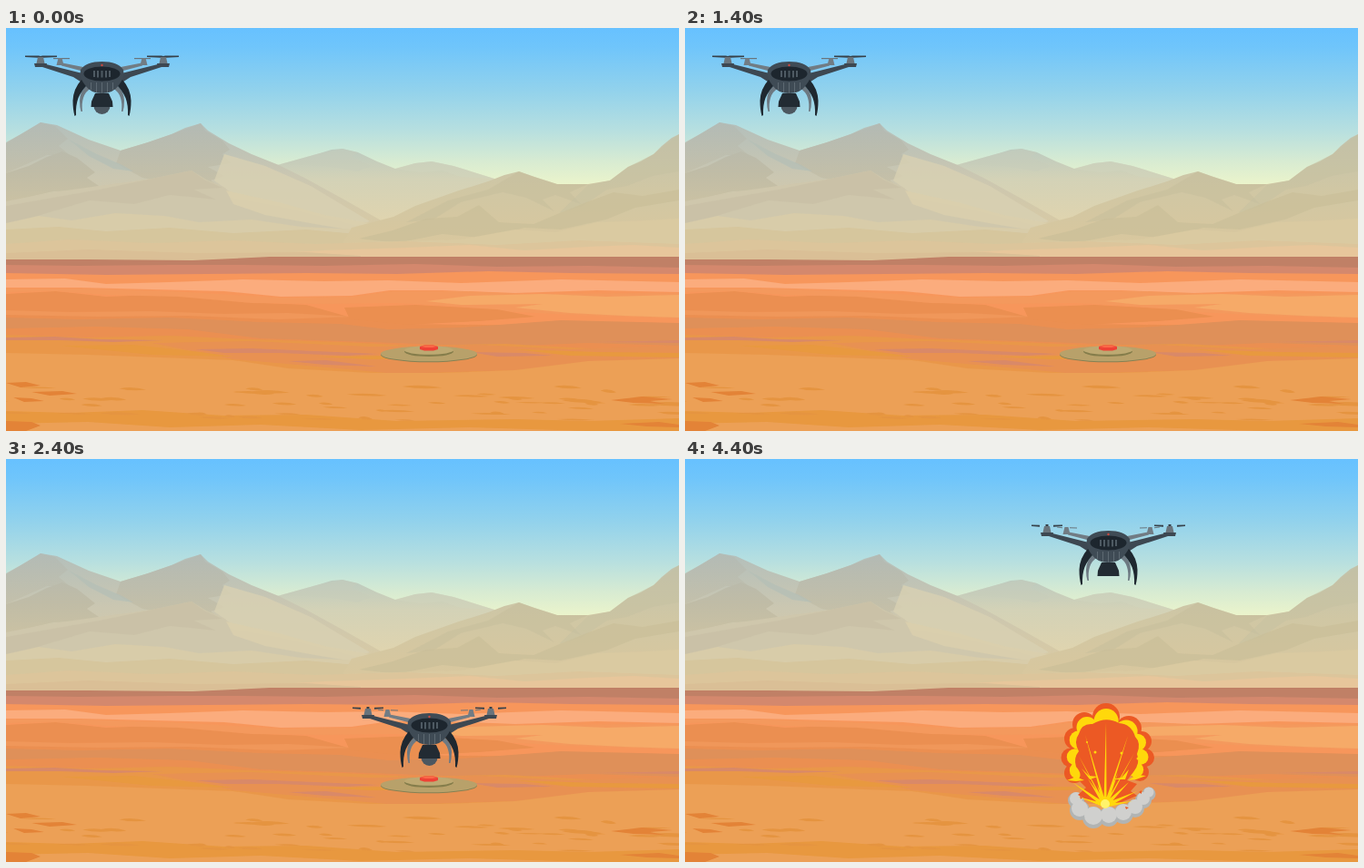
Animation of 740 by 444 pixels, one loop 5.59 s. Source, as an HTML page:

```html
<!DOCTYPE html>
<html lang="en">
<head>
<meta charset="utf-8">
<title>Desert drone</title>
<style>
html, body { margin: 0; width: 100%; height: 100%; overflow: hidden; }
svg { display: block; width: 100%; height: 100%; }
</style>
</head>
<body>
<svg viewBox="0 0 740 444" preserveAspectRatio="none">
<defs>
  <linearGradient id="sky" gradientUnits="userSpaceOnUse" x1="0" y1="0" x2="0" y2="172">
    <stop offset="0" stop-color="#67c1ff"/><stop offset=".12" stop-color="#6fc5fb"/>
    <stop offset=".4" stop-color="#92d2ec"/><stop offset=".65" stop-color="#b6dfe0"/>
    <stop offset=".85" stop-color="#d7ebd2"/><stop offset="1" stop-color="#ebf4cb"/>
  </linearGradient>
  <linearGradient id="left" gradientUnits="userSpaceOnUse" x1="0" y1="104" x2="0" y2="225">
    <stop offset="0" stop-color="#b3bfbb"/><stop offset=".5" stop-color="#cbc7b1"/><stop offset="1" stop-color="#d9caa3"/>
  </linearGradient>
  <linearGradient id="leftDark" gradientUnits="userSpaceOnUse" x1="0" y1="104" x2="0" y2="215">
    <stop offset="0" stop-color="#b2b8b2"/><stop offset=".5" stop-color="#c0bca6"/><stop offset="1" stop-color="#d1c5a1"/>
  </linearGradient>
  <linearGradient id="mid" gradientUnits="userSpaceOnUse" x1="0" y1="133" x2="0" y2="215">
    <stop offset="0" stop-color="#bccabf"/><stop offset=".4" stop-color="#d3d2b7"/><stop offset="1" stop-color="#e0d4ae"/>
  </linearGradient>
  <linearGradient id="right" gradientUnits="userSpaceOnUse" x1="0" y1="118" x2="0" y2="235">
    <stop offset="0" stop-color="#c2c2ac"/><stop offset=".5" stop-color="#d0c7a4"/><stop offset="1" stop-color="#d8c79e"/>
  </linearGradient>

  <g id="half">
    <path fill="#717c84" d="M62 38.500L90 44 86 48 61 41.500zM57.500 33h4l2 8h-8z"/>
    <path fill="#6d7982" d="M90 62Q81 70 81 80 81 87 82.500 92L84 92Q83 83 85 77 87 70 94 66z"/>
    <path fill="#3d4852" d="M42 39.500L84 50 95 60 88 63 74 54 40 43zM31 39h14l-1 4H32z"/>
    <path fill="#69747c" d="M35 32h6l1.500 7h-9z"/>
    <path fill="#1f2830" d="M83 57Q74 67 73.500 80 73.500 90 75.500 97L77 96Q76.500 85 79.500 77 83 69 90 62z"/>
  </g>
  <g id="fullProps" fill="#36414a">
    <path d="M21 30.500h15l2 .5 2-.5h16v1.500l-16 .7h-4l-15-.7z"/>
    <path fill="#68747c" d="M52 33h18v1.200H52z"/>
  </g>
  <g id="splitProps" fill="#36414a">
    <path d="M21 30.500l9 .2v2l-9-.8zM45 30.700l10-.2v1.500l-10 .8zM36.500 30h3v3h-3z"/>
    <path fill="#68747c" d="M49 32.500l6 .7v1l-6-.7zM63 33.200l8 .3v1l-8-.3z"/>
  </g>
</defs>

<rect width="740" height="444" fill="url(#sky)"/>

<!-- mountains -->
<path fill="url(#mid)" d="M290 153L302 150 345 138 358 134 370 133 387 137 408 147 428 155 450 149 468 147 492 152 537 166 560 240 290 240z"/>
<path fill="#d2d6bd" opacity=".5" d="M428 155L450 149 468 147 492 152 537 166 500 164 480 157 455 159z"/>
<path fill="#c5cab8" opacity=".4" d="M302 150L345 138 370 133 387 137 380 142 402 152 386 158 350 152z"/>
<path fill="url(#left)" d="M0 126L18 116 38 104 56 107 91 123 126 135 156 126 182 117 197 110 214 105 222 113 245 127 270 139 300 151 330 166 370 188 430 222 430 258H0z"/>
<path fill="url(#leftDark)" opacity=".75" d="M126 135L156 126 182 117 214 105 219 113 238 124 246 134 238 139 247 149 222 153 240 163 225 168 246 182 205 178 150 165 121 149z"/>
<path fill="url(#leftDark)" opacity=".6" d="M0 127L18 116 38 104 54 108 68 122 58 130 70 140 45 140 0 160z"/>
<path fill="#b4bfb7" opacity=".7" d="M68 122L98 138 128 151 140 158 118 155 91 141z"/>
<path fill="#d9d1b3" opacity=".8" d="M240 139L285 152 335 174 400 213 368 221 320 207 262 196 238 180 247 181 229 168z"/>
<path fill="url(#leftDark)" d="M0 160L25 152 45 142 62 136 78 143 98 159 89 165 102 174 82 179 52 180 0 192z"/>
<path fill="#cfc7ac" d="M0 191L52 181 102 174 160 166 204 157 220 167 241 176 248 187 300 196 365 212 420 228 420 250H0z"/>
<path fill="#c6bea4" opacity=".55" d="M102 178L160 166 204 157 218 167 238 176 207 178 231 189 180 184 141 194 92 190 35 207 0 217V196z"/>
<path fill="#dbd0ad" opacity=".9" d="M242 179L300 192 350 206 405 216 400 226 340 216 285 206 250 194z"/>
<path fill="#d8cca9" d="M0 215L36 207 72 212 120 204 174 207 212 214 270 211 324 219 410 223 450 258H0z"/>
<path fill="#d6c69d" d="M0 222L58 219 110 224 180 220 250 226 330 222 430 231 430 258H0z"/>
<path fill="url(#right)" d="M380 220L426 208 450 196 498 179 530 169 548 162 564 158 581 164 606 172 640 172 664 168 684 153 698 147 712 139 721 130 732 121 740 117V256H360z"/>
<path fill="#c5be9b" opacity=".5" d="M564 158L581 164 606 172 640 172 620 181 632 194 604 184 590 189 603 202 572 187 546 181 500 192 470 211 440 214 486 190 530 178z"/>
<path fill="#c4bf9f" opacity=".45" d="M640 173L664 168 684 153 712 139 740 117V158L711 163 683 174 661 178 634 196 608 204z"/>
<path fill="#cabf98" opacity=".65" d="M388 232L425 223 462 210 496 208 520 195 542 214 580 216 606 205 638 192 668 181 700 185 740 178V190L692 198 660 211 610 222 570 220 530 232 480 227 430 237z"/>
<path fill="#dacaa1" d="M360 238L430 235 500 233 560 222 604 225 650 214 704 212 740 210V258H330z"/>
<path fill="#dcc59b" d="M0 238L70 233 160 237 250 234 340 238 440 235 540 239 630 234 740 238V260H0z"/>
<path fill="#e7c69b" d="M270 250L350 245 440 242 510 239 570 245 640 241 690 239 740 242V260H270z"/>
<path fill="#dabf96" d="M0 248L90 244 210 248 330 247 390 251 390 260H0z"/>

<!-- desert floor -->
<path fill="#c08066" d="M0 255L90 255 205 256 250 254 290 252 740 252V444H0z"/>
<path fill="#d4886d" d="M0 261L80 262 180 261 260 261 350 262 450 260 540 263 640 262 740 264V444H0z"/>
<path fill="#f7965b" d="M0 270L110 272 220 271 330 270 430 271 530 268 620 270 740 271V444H0z"/>
<path fill="#fbac7d" d="M0 277L65 276 110 282 180 280 260 277 350 279 420 278 500 281 610 277 740 280V291L650 289 560 292 480 289 422 289 380 295 302 296 240 290 160 288 82 286 0 286z"/>
<path fill="#eb8f51" d="M0 293L55 290 110 296 190 293 260 302 330 305 376 318 445 326 740 330V444H0z"/>
<path fill="#f4995d" d="M0 287L82 287 180 290 302 297 382 296 424 290 500 290 570 293 740 292V320L650 317 560 313 500 307 430 303 350 304 270 303 190 296 110 294 55 290 0 291z"/>
<path fill="#f6aa68" d="M462 301L510 295 590 293 660 296 740 294V319L680 317 620 314 560 308 590 304 500 305z"/>
<path fill="#f0975a" d="M0 311L70 313 160 312 240 315 310 314 382 318 300 321 200 317 100 318 0 316z"/>
<path fill="#df9059" d="M0 319L80 321 180 319 280 324 368 326 420 332 500 330 610 322 740 325V350L640 347 540 351 400 346 280 342 200 332 100 329 0 331z"/>
<path fill="#eb8f50" d="M372 308L450 305 540 310 582 318 520 323 440 327 378 321z"/>
<path fill="#e99749" d="M0 338L90 341 180 339 270 343 370 346 450 350 550 348 640 353 740 352V444H0z"/>
<path fill="#e89152" d="M160 347L270 345 400 351 520 349 620 354 740 350V371L650 367 560 377 430 381 320 371 250 365z"/>
<path fill="#d98968" d="M0 341L54 340 105 343 174 344 118 346 60 344 0 344zM208 354L270 353 340 356 410 359 375 361 300 358 240 358zM310 367L352 366 408 373 350 371zM510 357L570 358 602 361 540 362zM650 346L740 344V347z"/>
<path fill="#e8993f" d="M60 350L140 349 214 357 250 362 160 360zM560 354L650 357 740 358V363L620 361zM340 362L430 361 500 364 400 365z"/>
<path fill="#eca056" d="M0 358L90 360 170 363 250 366 310 375 400 380 480 380 560 377 640 367 740 364V444H0z"/>
<path fill="#e8983f" d="M0 422L70 424 150 421 240 427 330 426 430 433 560 431 640 433 740 430V444H640L510 440 390 443 280 437 180 440 90 434 0 436z"/>
<path id="ripples" fill="#e59440"/>
<path fill="#e38337" d="M0 391L22 390 38 394 16 396zM28 401L62 400 78 403 48 405zM0 433L28 434 38 438 22 444H0zM665 410L700 406 733 409 708 411 725 414 690 413zM8 407L28 408 42 411 20 412zM675 436L718 434 740 437V440L705 439z"/>

<!-- mine -->
<g id="mine">
  <ellipse cx="465" cy="360" rx="53" ry="8.300" fill="#858053"/>
  <ellipse cx="465" cy="359" rx="53" ry="8.300" fill="#b8a16a"/>
  <ellipse cx="465" cy="356.500" rx="27" ry="5.500" fill="#857d4b"/>
  <ellipse cx="465" cy="355" rx="27" ry="4.800" fill="#bda972"/>
  <path fill="#ef4135" d="M455 351l5-1.500h10l5 1.500v3l-5 1.500h-10l-5-1.500z"/>
  <path fill="#fb6848" d="M456 351l4-1h10l4 1-5 1h-8z"/>
</g>

<g id="bomb">
  <circle cx="465" cy="338" r="15" fill="#37434c"/>
  <circle cx="465" cy="338" r="15" fill="none" stroke="#2a343c" stroke-width="2.500" stroke-dasharray="3.850 4"/>
  <path stroke="#57636b" d="M455 328l20 20M475 328l-20 20"/>
  <g fill="#a8b4b9">
    <circle cx="453.500" cy="329.500" r="2.500"/><circle cx="476.500" cy="329.500" r="2.500"/>
    <circle cx="457" cy="349" r="2.500"/><circle cx="474" cy="349" r="2.500"/>
  </g>
  <circle cx="465" cy="338" r="3" fill="#d0d5d2"/>
  <path fill="#ef4135" d="M456 352h5l2 1h5l2-1h5v2l-4 1h-12l-3-1z"/>
</g>

<g id="drone">
  <use id="propL"/><use id="propR" transform="translate(211) scale(-1 1)"/>
  <use href="#half"/><use href="#half" transform="translate(211) scale(-1 1)"/>
  <circle id="payload" cx="105.500" cy="86" r="9" fill="#4c5760"/>
  <path fill="#222b33" d="M98 72h15l4 9 .5 6h-24l.5-6z"/>
  <path fill="#3f4b55" d="M82 46Q88 37 105.500 37 123 37 129 46 131 54 124 63 118 72 105.500 72 93 72 87 63 80 54 82 46z"/>
  <path stroke="#5d6972" fill="none" d="M93.500 60v8M99.500 60v11M105.500 60v12M111.500 60v11M117.500 60v8"/>
  <ellipse cx="105.500" cy="50.500" rx="20" ry="8" fill="#1d262e"/>
  <path stroke="#4e5a63" stroke-width="2" d="M97 47v7M101 47v7.500M105.500 47v7.500M110 47v7.500M114 47v7"/>
  <circle cx="105.500" cy="41" r="1.200" fill="#cf4940"/>
</g>

<g id="blast">
  <g id="smoke"></g>
  <g id="flame"></g>
  <path fill="#ec5924" d="M433 303Q436 291 448 292 463 283 477 291 491 292 495 306 502 313 497 325 501 335 493 345L486 354 497 358 490 366 497 371 480 378 463 384 444 377 432 370 441 362 432 353Q438 348 430 339 427 329 433 322 427 311 433 303z"/>
  <path id="rays" fill="#ffd80b"/>
  <path fill="#ffd80b" d="M420 354l10-4 9 4-9 1zM436 341l8 8 10 1-9 3zM470 353l10-2 8-9-4 11zM487 354l9-6 11 1-11 4z"/>
  <g fill="#ffd80b"><circle cx="451" cy="323" r="1.500"/><circle cx="480" cy="324" r="1.500"/><circle cx="498" cy="330" r="1.500"/><circle cx="442" cy="312" r="1"/></g>
  <circle cx="462" cy="380" r="5" fill="#fff36c"/>
  <path fill="#e95a27" d="M434 371l3 2-2 2zM484 383l4 1-3 2zM499 367l3-2v4z"/>
</g>
</svg>

<script>
const LOOP = 5590, FRAME_RATE = 15;
const el = id => document.getElementById(id);

function drawRipples() {
  let seed = 11, d = "";
  const rand = () => (seed = seed * 16807 % 2147483647) / 2147483647;
  for (let i = 0; i < 60; i++) {
    const x = rand() * 740 - 20, y = 394 + rand() * 38;
    const w = 12 + rand() * 34, h = .6 + rand();
    d += `M${x} ${y}q${w / 2} ${-h * 2} ${w} ${h}q${-w / 2} ${h * 1.5} ${-w} ${-h}z`;
  }
  el("ripples").setAttribute("d", d);
}

const circles = (list, fill, dx = 0, dy = 0, shrink = 0) => list.map(([x, y, r]) =>
  `<circle cx="${x + dx}" cy="${y + dy}" r="${r - shrink}" fill="${fill}"/>`).join("");

function drawBlast() {
  const lobes = [[463, 284, 15], [439, 292, 13], [429, 308, 12], [424, 329, 10.5], [428, 346, 11],
    [488, 297, 14], [502, 311, 11], [506, 329, 10], [500, 345, 10]];
  const puffs = [[430, 376, 9], [510, 369, 7.5], [434, 387, 11], [449, 395, 12],
    [466, 394, 11], [482, 391, 11], [495, 385, 10], [504, 376, 9]];
  const toCore = lobes.map(([x, y, r]) => [x + (464 - x) * .12, y + (322 - y) * .12, r - 1.5]);
  el("flame").innerHTML = circles(lobes, "#ec5924") + circles(toCore, "#ffd80b");
  el("smoke").innerHTML = circles(puffs, "#b1b4b4") + circles(puffs, "#d0d0ce", 0, -2, 2);

  // Tip and half width of each ray
  const tips = [[463, 290, 1.6], [440, 304, 1.5], [487, 305, 1.5], [433, 327, 1], [494, 324, 1],
    [426, 356, 2.5], [435, 362, 2.5], [443, 352, 2], [476, 346, 2], [488, 356, 2.5],
    [497, 366, 2.5], [492, 377, 2], [432, 372, 2], [453, 359, 2], [469, 359, 2]];
  el("rays").setAttribute("d", tips.map(([x, y, w]) => {
    const a = Math.atan2(y - 382, x - 462), px = -Math.sin(a) * w, py = Math.cos(a) * w;
    return `M${462 + px} ${382 + py}L${x} ${y} ${462 - px} ${382 - py}z`;
  }).join(""));
}

// Each move: start, end (in ticks), from, to
const movesX = [[9.4, 15.35, 0, 423], [15.35, 19.95, 423, 0], [19.95, 25.65, 0, 360]];
const movesY = [[28.6, 36, 0, 243], [39.6, 47, 243, 42]];

const ease = u => u < .5 ? 4 * u ** 3 : 1 - 4 * (1 - u) ** 3;

function position(moves, tick) {
  let value = 0;
  for (const [start, end, from, to] of moves)
    if (tick >= start) value = from + (to - from) * ease(Math.min(1, (tick - start) / (end - start)));
  return Math.round(value);
}

const show = (id, on) => el(id).setAttribute("visibility", on ? "visible" : "hidden");

function render(now) {
  const tick = Math.floor((now % LOOP + 4) * FRAME_RATE / 1000);
  el("drone").setAttribute("transform", `translate(${position(movesX, tick)} ${position(movesY, tick)})`);
  const props = tick < 27 ? "#fullProps" : "#splitProps";
  el("propL").setAttribute("href", props);
  el("propR").setAttribute("href", props);
  show("payload", tick < 38);
  show("bomb", tick >= 38 && tick < 64);
  show("mine", tick < 66);
  show("blast", tick >= 64);
}

drawRipples();
drawBlast();
const began = performance.now();
function loop() {
  render(performance.now() - began);
  requestAnimationFrame(loop);
}
loop();
</script>
</body>
</html>
```
